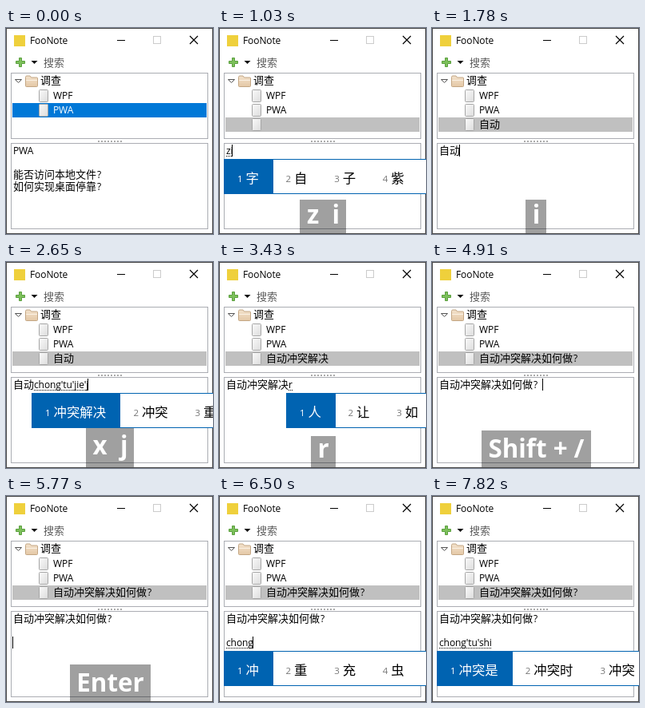
Write an HTML page that moves like this. It is 259 px wide and 258 px high and loops after 8 s.

```html
<!DOCTYPE html>
<html lang="zh-CN">
<head>
<meta charset="utf-8">
<title>FooNote</title>
<style>
html, body { margin: 0; width: 100%; height: 100%; overflow: hidden; background: #fff; }
svg { display: block; width: 259px; height: 258px; }
text { font: 13px "Noto Sans CJK SC", "Noto Sans CJK", sans-serif; white-space: pre; }
.l { font: 12px "Open Sans", "Noto Sans", sans-serif; letter-spacing: -.1px; }
.cand { font-size: 16.4px; }
.num { font: 11.5px "Open Sans", "Noto Sans", sans-serif; fill: #777; }
.first { fill: #fff; }
.key { font: 700 31.3px "Open Sans", "Noto Sans", sans-serif; fill: #fff; text-anchor: middle; }
.crisp { shape-rendering: crispEdges; }
</style>
</head>
<body>
<svg viewBox="0 0 259 258">
  <defs>
    <linearGradient id="paper" x2="1" y2="1">
      <stop stop-color="#fafafa"/><stop offset="1" stop-color="#dcdcdc"/>
    </linearGradient>
    <linearGradient id="tan" x2="0" y2="1">
      <stop stop-color="#f3e2cc"/><stop offset="1" stop-color="#e4c8a6"/>
    </linearGradient>
    <path id="page" d="M.5 1.5q0-1 1-1h9q1 0 1 1v13q0 1-1 1h-9q-1 0-1-1z" fill="url(#paper)" stroke="#a6a6a6"/>
  </defs>

  <rect width="259" height="258" fill="#fff"/>
  <rect class="crisp" x=".5" y=".5" width="258" height="257" fill="none" stroke="#484848"/>

  <!-- title bar -->
  <rect x="10" y="9" width="14" height="14" fill="#efd03c"/>
  <text class="l" x="30" y="20">FooNote</text>
  <path class="crisp" d="M139 15.5h10" stroke="#000"/>
  <rect class="crisp" x="184.5" y="10.5" width="9" height="9" fill="none" stroke="#ccc"/>
  <path d="M230 10l10 10M240 10l-10 10" stroke="#000" stroke-width="1.2"/>

  <!-- toolbar -->
  <path d="M16.5 37.5h3v4h4v3h-4v4h-3v-4h-4v-3h4z" fill="#7cc05a" stroke="#5ca040" stroke-linejoin="round"/>
  <path d="M31.5 41h8l-4 4z" fill="#111"/>
  <text x="47" y="47.5" fill="#5c5c5c">搜索</text>

  <!-- tree -->
  <rect class="crisp" x="6.5" y="56.5" width="246" height="82" fill="#fff" stroke="#abadb3"/>
  <path d="M11.5 64.5h8l-4 4z" fill="#fff" stroke="#555"/>
  <path d="M24.5 61.5q0-1.5 1.5-1.5h4l1.5 2h7q1 0 1 1v9.5q0 1-1 1h-13q-1 0-1-1z" fill="url(#tan)" stroke="#c3a684"/>
  <path d="M25 65.5h14" stroke="#fbf1e4"/>
  <text x="43" y="70">调查</text>
  <rect id="bar" class="crisp" x="8" width="243" height="18"/>
  <use href="#page" x="41" y="77"/>
  <text class="l" x="59" y="89">WPF</text>
  <use href="#page" x="41" y="95"/>
  <text class="l" id="pwa" x="59" y="107">PWA</text>
  <g id="row">
    <use href="#page" x="41" y="113"/>
    <text id="rowText" x="59" y="124.5"></text>
  </g>
  <path class="crisp" d="M115 142h30" stroke="#aaa" stroke-width="2" stroke-dasharray="2 2"/>

  <!-- editor -->
  <rect class="crisp" x="6.5" y="144.5" width="246" height="107" fill="#fff" stroke="#abadb3"/>
  <g id="old">
    <text class="l" x="9" y="158">PWA</text>
    <text x="9" y="187.5">能否访问本地文件<tspan class="l" dx="1">?</tspan></text>
    <text x="9" y="202.5">如何实现桌面停靠<tspan class="l" dx="1">?</tspan></text>
  </g>
  <text id="done" x="9" y="157.5"></text>
  <text class="l" id="comp"></text>
  <path class="crisp" id="dots" stroke="#000" stroke-dasharray="1 1"/>
  <rect class="crisp" id="caret" width="1" height="15"/>
  <g id="ime"></g>
  <g id="keys"></g>
</svg>
<script>
const $ = id => document.getElementById(id);
const LOOP = 8000;

// Each step changes only the named fields:
// row title, done text, comp(osition), cand(idates), key label, line, caret, left edge of the candidates
const steps = [
  [0, { row: null, done: '', comp: '', cand: '', key: '', line: 0, caret: 0, left: null }],
  [310, { row: '' }],
  [430, { caret: 1 }],
  [560, { key: 'z' }],
  [640, { comp: 'z', cand: '在 做 最 再' }],
  [800, { key: 'z  i', comp: 'zi', cand: '字 自 子 紫' }],
  [1040, { key: 'd' }],
  [1180, { comp: "zi'd", cand: '自动 字典 字' }],
  [1320, { key: 'd  s' }],
  [1400, { comp: "zi'dong", cand: '自动 字 自' }],
  [1490, { key: '' }],
  [1560, { done: '自动', comp: '', cand: '' }],
  [1640, { row: '自动' }],
  [1780, { key: 'i' }],
  [1870, { comp: 'ch', cand: '出 成 吃 车' }],
  [1950, { key: 'i  s' }],
  [2030, { comp: 'chong', cand: '冲 重 充 虫' }],
  [2120, { key: 't' }],
  [2200, { comp: "chong't", cand: '冲突 冲 重' }],
  [2330, { key: 't  u', comp: "chong'tu" }],
  [2420, { key: 'j' }],
  [2500, { comp: "chong'tu'j", cand: '冲突就 冲突 重' }],
  [2580, { key: 'x', comp: "chong'tu'jie", cand: '冲突解 冲突 重' }],
  [2650, { key: 'x  j', comp: "chong'tu'jie'j", cand: '冲突解决 冲突 重' }],
  [2800, { key: 't', comp: "chong'tu'jie'jue", left: 21 }],
  [2960, { done: '自动冲突解决', comp: '', cand: '', left: null }],
  [3040, { row: '自动冲突解决' }],
  [3140, { key: '' }],
  [3350, { key: 'r' }],
  [3430, { comp: 'r', cand: '人 让 如 日', caret: 0 }],
  [3500, { key: 'r  u', comp: 'ru', cand: '如 入 乳 儒', caret: 1 }],
  [3730, { key: 'h' }],
  [3820, { comp: "ru'h", cand: '如何 如 入', left: 60 }],
  [3910, { key: 'h  e', comp: "ru'he" }],
  [4030, { key: 'z' }],
  [4120, { comp: "ru'he'z", cand: '如何在 如何 如' }],
  [4210, { key: 'z  o', comp: "ru'he'zuo", cand: '如何做 如何 如 入', left: 4 }],
  [4370, { done: '自动冲突解决如何做', comp: '', cand: '', left: null }],
  [4460, { row: '自动冲突解决如何做' }],
  [4600, { key: '' }],
  [4830, { key: 'Shift + /' }],
  [4910, { done: '自动冲突解决如何做?', row: '自动冲突解决如何做?' }],
  [5140, { key: '' }],
  [5460, { key: 'Enter' }],
  [5560, { line: 1 }],
  [5690, { line: 2 }],
  [5900, { key: '' }],
  [6150, { key: 'i' }],
  [6240, { comp: 'ch', cand: '出 成 吃 车' }],
  [6350, { key: 'i  s', comp: 'chong', cand: '冲 重 充 虫' }],
  [6500, { key: '' }],
  [6570, { key: 't' }],
  [6660, { comp: "chong't", cand: '冲突 冲 重' }],
  [6790, { key: 't  u', comp: "chong'tu" }],
  [6950, { key: 'u' }],
  [7050, { comp: "chong'tu'sh", cand: '冲突时 冲突是 冲突' }],
  [7160, { key: 'u  i' }],
  [7270, { comp: "chong'tu'shi", cand: '冲突是 冲突时 冲突' }],
  [7520, { key: '' }],
  [7820, { caret: 0 }],
];
const states = [];
steps.forEach(([, change], i) => states.push({ ...states[i - 1], ...change }));

const show = (id, on) => $(id).setAttribute('visibility', on ? 'visible' : 'hidden');
const put = (id, attrs) => {
  for (const name in attrs) $(id).setAttribute(name, attrs[name]);
};
const mixed = s => s.replace('?', '<tspan class="l" dx="1">?</tspan>');

function candidates(list, x, y) {
  if (!list) return '';
  let at = x + 1, out = '';
  list.split(' ').forEach((word, i) => {
    const w = 44 + 16.6 * word.length;
    const tone = i ? '' : ' first';
    if (!i) out += `<rect class="crisp" x="${x}" y="${y}" width="${Math.round(w + 1)}" height="44" fill="#0063b1"/>`;
    out += `<text class="num${tone}" x="${at + 16}" y="${y + 29}">${i + 1}</text>`
         + `<text class="cand${tone}" x="${at + 26.5}" y="${y + 30}">${word}</text>`;
    at += w;
  });
  const width = Math.max(at - x, 260 - x);
  return `<rect class="crisp" x="${x + .5}" y="${y + .5}" width="${width}" height="43" fill="#fff" stroke="#0063b1"/>` + out;
}

function keyLabel(label) {
  if (!label) return '';
  const deep = label.includes('j');
  const top = deep ? 208 : label.length > 4 ? 211 : /[itdh]/.test(label) ? 215 : 218;
  $('keys').innerHTML = `<text class="key" x="130.5" y="${deep ? 241 : 245}">${label}</text>`;
  const w = Math.round($('keys').firstChild.getComputedTextLength() + 16.5);
  const x = Math.floor(130.5 - w / 2);
  return `<rect class="crisp" x="${x}" y="${top}" width="${w}" height="${257 - top}" fill="#000" fill-opacity=".373"/>` + $('keys').innerHTML;
}

function draw(s) {
  const fresh = s.row !== null;
  show('old', !fresh);
  show('row', fresh);
  put('bar', { y: fresh ? 112 : 94, fill: fresh ? '#c0c0c0' : '#0078d7' });
  put('pwa', { fill: fresh ? '#000' : '#fff' });
  $('rowText').innerHTML = mixed(s.row || '');
  $('done').innerHTML = mixed(s.done);

  const start = 9 + (s.line ? 0 : 13 * s.done.length);
  const top = 146 + 15 * s.line;
  put('comp', { x: start, y: top + 12 });
  $('comp').textContent = s.comp;
  const end = start + (s.comp ? Math.round($('comp').getComputedTextLength()) : 0);
  put('dots', { d: `M${start} ${top + 14.5}H${end}` });
  put('caret', { x: end - 1, y: top });
  show('caret', s.caret);
  $('ime').innerHTML = candidates(s.cand, s.left ?? start - 3, top + 18);
  $('keys').innerHTML = keyLabel(s.key);
}

let shown = -1;
function tick() {
  const t = performance.now() % LOOP;
  let i = steps.length - 1;
  while (steps[i][0] > t) i--;
  if (i !== shown) draw(states[shown = i]);
  requestAnimationFrame(tick);
}
tick();
</script>
</body>
</html>
```
